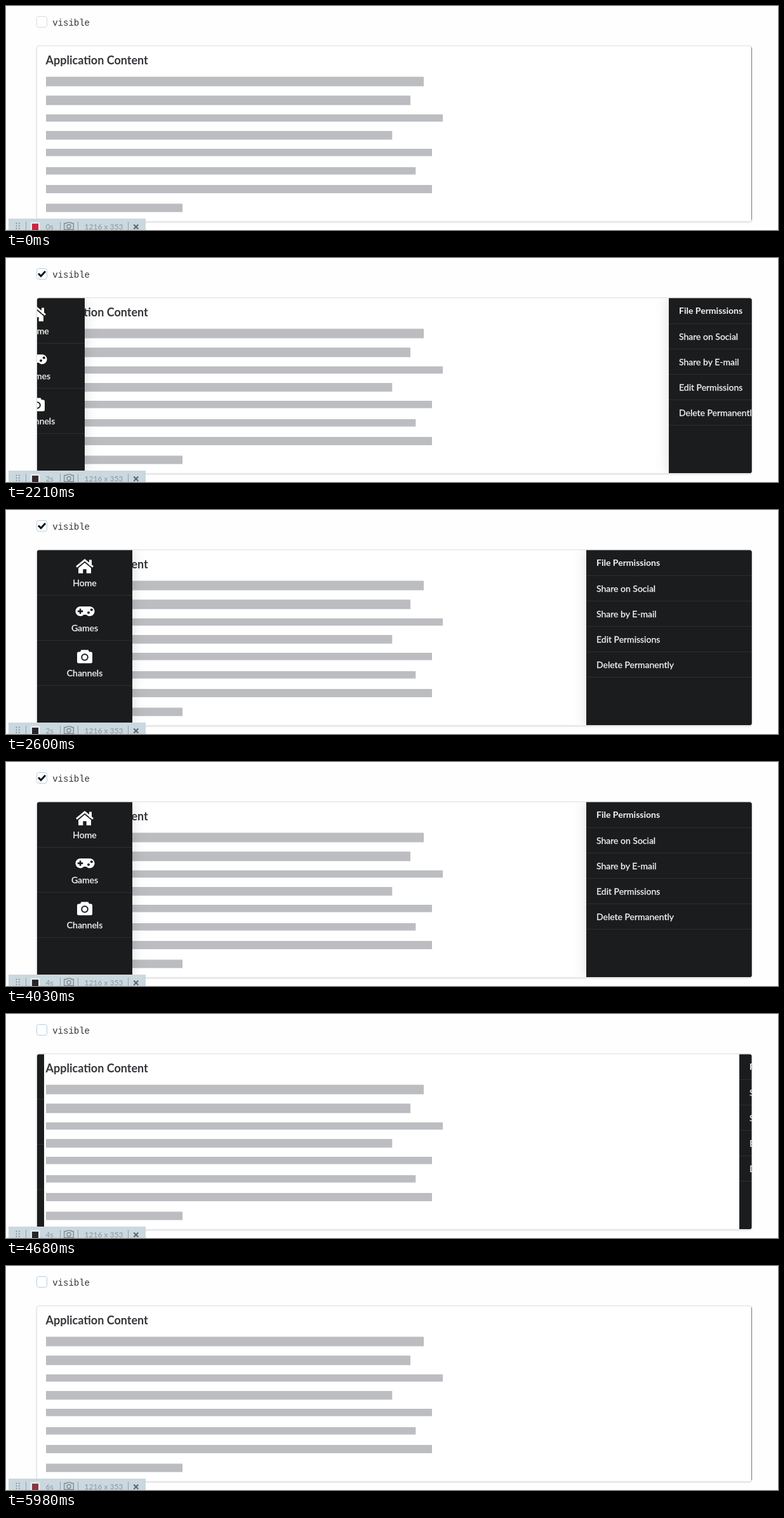
An HTML page for the animation above (6110 ms loop, 1216 by 353 pixels).

```html
<!DOCTYPE html>
<html lang="en">
<head>
<meta charset="utf-8">
<title>Sidebar overlay</title>
<style>
  html, body { margin: 0; width: 100%; height: 100%; overflow: hidden; background: #fefefe; }
  svg { display: block; }
  text { font-family: Lato, sans-serif; font-size: 14px; }

  /* One loop is 47 ticks of 130 ms; every state is held for whole ticks. */
  .box, .tick, .side, .shade, .count { animation: 6110ms step-end infinite; }
  .rec { animation: rec 6110ms infinite; }

  .box { fill: #fff; animation-name: box; }
  .tick { fill: none; stroke: #161616; stroke-width: 3; animation-name: tick; }
  .side { animation-name: slide; }
  .shade { filter: drop-shadow(0 0 10px rgba(34, 36, 38, .17)); animation-name: shade; }
  .count { animation-name: count; }

  .left { --w: -150px; text-anchor: middle; }
  .right { --w: 260px; }
  .panel { fill: #1b1c1d; }
  .rule { stroke: #2d2e2f; }
  .label { fill: #f4f4f4; stroke: #f4f4f4; stroke-width: .3; }
  .icon { fill: #fff; }
  .hole { fill: none; stroke: #1b1c1d; }
  .bars { fill: #bcbdc0; }
  .bar text { font-size: 12px; fill: #8b979d; }

  @keyframes box {
    0% { stroke: #d8d9da; }
    25.53% { stroke: #b4b5b6; }
    34.04%, 100% { stroke: #b3d0dc; }
  }
  @keyframes tick {
    0% { opacity: 0; }
    34.04% { opacity: 1; }
    72.34%, 100% { opacity: 0; }
  }
  @keyframes slide {
    0% { transform: translateX(var(--w)); }
    36.17% { transform: translateX(calc(var(--w) * .5)); }
    38.29% { transform: translateX(calc(var(--w) * .115)); }
    40.42% { transform: translateX(calc(var(--w) * .015)); }
    42.55% { transform: translateX(0); }
    72.34% { transform: translateX(calc(var(--w) * .04)); }
    74.46% { transform: translateX(calc(var(--w) * .373)); }
    76.59% { transform: translateX(calc(var(--w) * .927)); }
    78.72% { transform: translateX(calc(var(--w) * .99)); }
    80.85%, 100% { transform: translateX(var(--w)); }
  }
  @keyframes shade {
    0% { opacity: 0; }
    36.17% { opacity: 1; }
    72.34%, 100% { opacity: 0; }
  }
  @keyframes count {
    0% { transform: translateY(0); }
    14.89% { transform: translateY(-20px); }
    31.91% { transform: translateY(-40px); }
    48.93% { transform: translateY(-60px); }
    65.95% { transform: translateY(-80px); }
    82.97% { transform: translateY(-100px); }
    97.87%, 100% { transform: translateY(-120px); }
  }
  @keyframes rec {
    0% { fill: #c9283f; animation-timing-function: steps(7); }
    14.89% { fill: #80323c; }
    23.4% { fill: #80323c; animation-timing-function: steps(7); }
    38.29% { fill: #25252a; }
    76.59% { fill: #25252a; animation-timing-function: steps(10); }
    97.87% { fill: #8a3541; animation-timing-function: step-end; }
    100% { fill: #c9283f; }
  }
</style>
</head>
<body>
<svg width="1216" height="353" viewBox="0 0 1216 353">
  <defs>
    <clipPath id="inner"><rect x="49" y="63.5" width="1125.5" height="275.5" rx="3"/></clipPath>
  </defs>

  <rect class="box" x="48.5" y="16.5" width="16" height="17" rx="3"/>
  <path class="tick" d="M51 24.5l4 4 7-7.5"/>
  <text x="73.2" y="31" fill="#333" style="font-family: 'Liberation Mono', monospace">visible</text>

  <rect x="48.5" y="62.8" width="1126" height="277" rx="3.5" fill="#fff" stroke="#dedede"
        style="filter: drop-shadow(0 1px 1px rgba(34, 36, 38, .13))"/>
  <text x="62.6" y="92.3" fill="#35363a" style="font-size: 18px; font-weight: 700">Application Content</text>
  <g class="bars">
    <rect x="63" y="111.5" width="595" height="15"/>
    <rect x="63" y="141.2" width="574" height="15"/>
    <rect x="63" y="170.8" width="625" height="11.4"/>
    <rect x="63" y="197" width="545.3" height="13.6"/>
    <rect x="63" y="225" width="608" height="11.6"/>
    <rect x="63" y="254" width="582.3" height="11.6"/>
    <rect x="63" y="282" width="608" height="13"/>
    <rect x="63" y="311.5" width="215" height="13.2"/>
  </g>

  <g clip-path="url(#inner)">
    <g class="side left">
      <rect class="panel shade" x="49" y="63" width="150" height="277"/>
      <rect class="panel" x="49" y="63" width="150" height="277"/>
      <path class="rule" d="M49 134.5h150M49 205.5h150M49 276.5h150"/>
      <g class="icon">
        <path d="M131 78.5h4v9h-4zM114 91.5l10-8.6 10 8.6v8.3h-7.3v-6.6h-5.4v6.6H114z"/>
        <path d="M111 89.6l13-10.8 13 10.8" fill="none" stroke="#fff" stroke-width="2.8"/>
        <path d="M117 152h15a7.6 7.6 0 1 1-5.4 13h-4.2a7.6 7.6 0 1 1-5.4-13z"/>
        <path d="M114.500 220z"/>
        <path d="M118.500 220.500h11l1.500 3h2.500a2.500 2.500 0 0 1 2.500 2.500v13a2.500 2.500 0 0 1-2.500 2.500h-19a2.500 2.500 0 0 1-2.500-2.500v-13a2.500 2.500 0 0 1 2.500-2.500h2.500z"/>
      </g>
      <path class="hole" stroke-width="2.6" d="M112.800 159.600h8.400M117 155.400v8.400"/>
      <g class="panel"><circle cx="134.800" cy="157.200" r="2"/><circle cx="130" cy="161.800" r="2"/></g>
      <circle class="hole" cx="124" cy="232" r="4.800" stroke-width="2"/>
      <g class="label">
        <text x="124" y="119.500">Home</text>
        <text x="124" y="190.500">Games</text>
        <text x="124" y="261.800">Channels</text>
      </g>
    </g>

    <g class="side right">
      <rect class="panel shade" x="914" y="63" width="261" height="277"/>
      <rect class="panel" x="914" y="63" width="261" height="277"/>
      <path class="rule" d="M914 103.500h261M914 143.500h261M914 183.500h261M914 223.500h261M914 263.500h261"/>
      <text x="930" y="88.300" fill="#f4f4f4" font-weight="700">File Permissions</text>
      <g class="label">
        <text x="930" y="128.500">Share on Social</text>
        <text x="930" y="168.500">Share by E-mail</text>
        <text x="930" y="208.500">Edit Permissions</text>
        <text x="930" y="248.500">Delete Permanently</text>
      </g>
    </g>
  </g>

  <g class="bar">
    <rect x="4" y="335" width="216" height="18" fill="#cad8df"/>
    <path d="M16.500 342.500h0M20.800 342.500h0M16.500 346.500h0M20.800 346.500h0M16.500 350.500h0M20.800 350.500h0"
          stroke="#7d898f" stroke-width="2" stroke-linecap="round"/>
    <path d="M31.500 340v13M85.500 340v13M113.500 340v13M192.500 340v13" stroke="#94a1a8"/>
    <rect x="38.500" y="340.500" width="15" height="14" fill="#e3eaee"/>
    <rect class="rec" x="41" y="343" width="10" height="10"/>
    <svg x="60" y="338" width="22" height="15">
      <g class="count">
        <text x="2.500" y="14">0s</text>
        <text x="2.500" y="34">1s</text>
        <text x="2.500" y="54">2s</text>
        <text x="2.500" y="74">3s</text>
        <text x="2.500" y="94">4s</text>
        <text x="2.500" y="114">5s</text>
        <text x="2.500" y="134">6s</text>
      </g>
    </svg>
    <g fill="none" stroke="#7d898f" stroke-width="1.300">
      <path d="M95 342.500H91.700v10H106.300v-10H103l-1-1.300H96z"/>
      <circle cx="99" cy="347.500" r="3"/>
    </g>
    <text x="123.500" y="352">1216 x 353</text>
    <path d="M201.300 344.500l7 7M208.300 344.500l-7 7" stroke="#5c666b" stroke-width="2"/>
  </g>
</svg>
</body>
</html>
```
